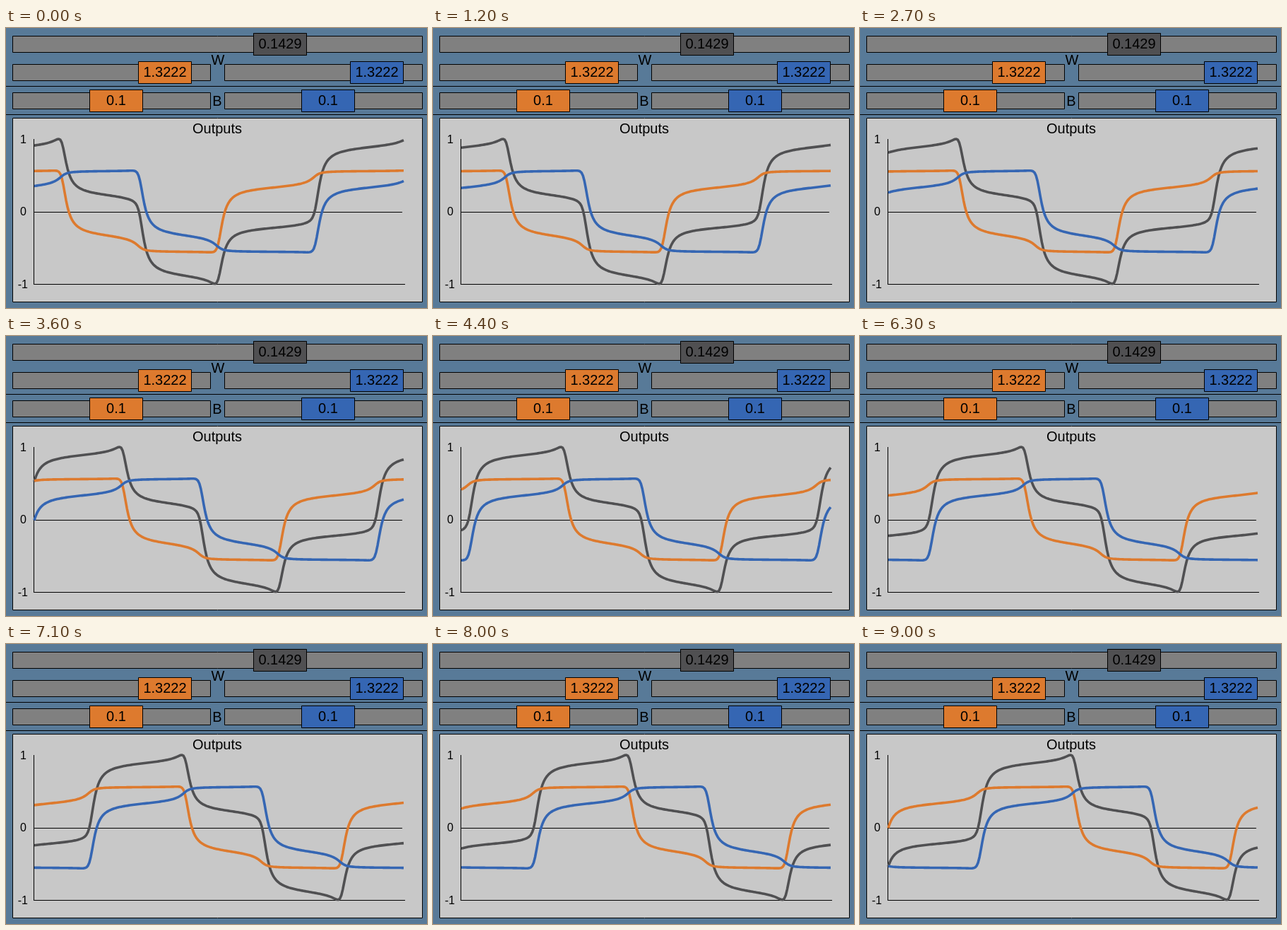
These frames come from a looping animation (596 px wide and 396 px high, 9100 ms). An HTML page with a canvas:

```html
<!DOCTYPE html>
<html lang="en">
<head>
<meta charset="utf-8">
<title>Outputs</title>
<style>
  html, body { margin: 0; width: 100%; height: 100%; overflow: hidden; background: #587a98; }
  canvas { display: block; width: 596px; height: 396px; }
</style>
</head>
<body>
<canvas id="stage" width="596" height="396"></canvas>
<script>
const ctx = document.getElementById('stage').getContext('2d');
const GREY = '#505052', ORANGE = '#dd7a2e', BLUE = '#3566b3';
const LOOP = 9100, FRAME = 100;

// Two coupled tanh neurons: self weight, cross weight, bias
const SELF = 1.3222, CROSS = 0.1429, BIAS = 0.001;
const POINTS = 256, LEFT = 40, STEP = 525 / POINTS;
const MID = 259.5, HALF = 102.5;
const PEAK_AGE = 17;

function simulate(count) {
  const states = [];
  let a = 0.5, b = 0.5;
  for (let i = 0; i < count; i++) {
    [a, b] = [
      Math.tanh(SELF * a + CROSS * b + BIAS),
      Math.tanh(SELF * b - CROSS * a + BIAS)
    ];
    states.push({ a, b, sum: a + b });
  }
  return states;
}

const states = simulate(2400);
let peak = 1400;
for (let i = peak; i < 2000; i++) {
  if (states[i].sum > states[peak].sum) peak = i;
}
const scale = HALF / states[peak].sum;

function box(x, y, w, h, fill) {
  ctx.fillStyle = fill;
  ctx.fillRect(x, y, w, h);
  ctx.strokeStyle = '#000';
  ctx.lineWidth = 1;
  ctx.strokeRect(x + 0.5, y + 0.5, w - 1, h - 1);
}

function text(str, x, y, size = 20, align = 'center') {
  ctx.font = size + 'px "Liberation Sans", Arial, sans-serif';
  ctx.textAlign = align;
  ctx.fillStyle = '#000';
  ctx.fillText(str, x, y);
}

function slider(x, y, w, knobX, label, fill) {
  box(x, y, w, 24, '#808080');
  box(knobX, y - 4, 76, 32, fill);
  text(label, knobX + 38, y + 18);
}

function drawControls() {
  ctx.fillStyle = '#587a98';
  ctx.fillRect(0, 0, 596, 396);
  slider(9, 11, 581, 350, '0.1429', GREY);
  slider(9, 51, 281, 187, '1.3222', ORANGE);
  slider(309, 51, 281, 487, '1.3222', BLUE);
  slider(9, 91, 281, 118, '0.1', ORANGE);
  slider(309, 91, 281, 418, '0.1', BLUE);
  ctx.fillStyle = '#000';
  ctx.fillRect(0, 82, 596, 1);
  ctx.fillRect(0, 122, 596, 1);
  text('W', 300, 52);
  text('B', 299, 110);
}

function drawPanel() {
  box(9, 127, 581, 261, '#c8c8c8');
  text('Outputs', 299, 149);
  text('1', 29, 163, 16, 'right');
  text('0', 29, 265, 16, 'right');
  text('-1', 31, 368, 16, 'right');
  ctx.fillRect(39, 157, 1, 206);
  ctx.fillRect(39, 260, 522, 1);
  ctx.fillRect(39, 362, 526, 1);
}

// Newest value sits at the left edge
function trace(key, color, newest) {
  ctx.beginPath();
  for (let i = 0; i < POINTS; i++) {
    ctx.lineTo(LEFT + i * STEP, MID - states[newest - i][key] * scale);
  }
  ctx.strokeStyle = color;
  ctx.lineWidth = 3.6;
  ctx.lineJoin = 'round';
  ctx.lineCap = 'butt';
  ctx.stroke();
}

// One step per tick at first, then one every 80 ms
function stepsAt(tick) {
  return tick < 12 ? tick : 12 + Math.floor((tick - 12) * 1.25);
}

const start = performance.now();

function draw() {
  const time = Math.max(0, performance.now() - start) % LOOP;
  const newest = peak + PEAK_AGE + stepsAt(Math.floor(time / FRAME));
  drawControls();
  drawPanel();
  trace('sum', GREY, newest);
  trace('a', ORANGE, newest);
  trace('b', BLUE, newest);
  requestAnimationFrame(draw);
}
draw();
</script>
</body>
</html>
```
